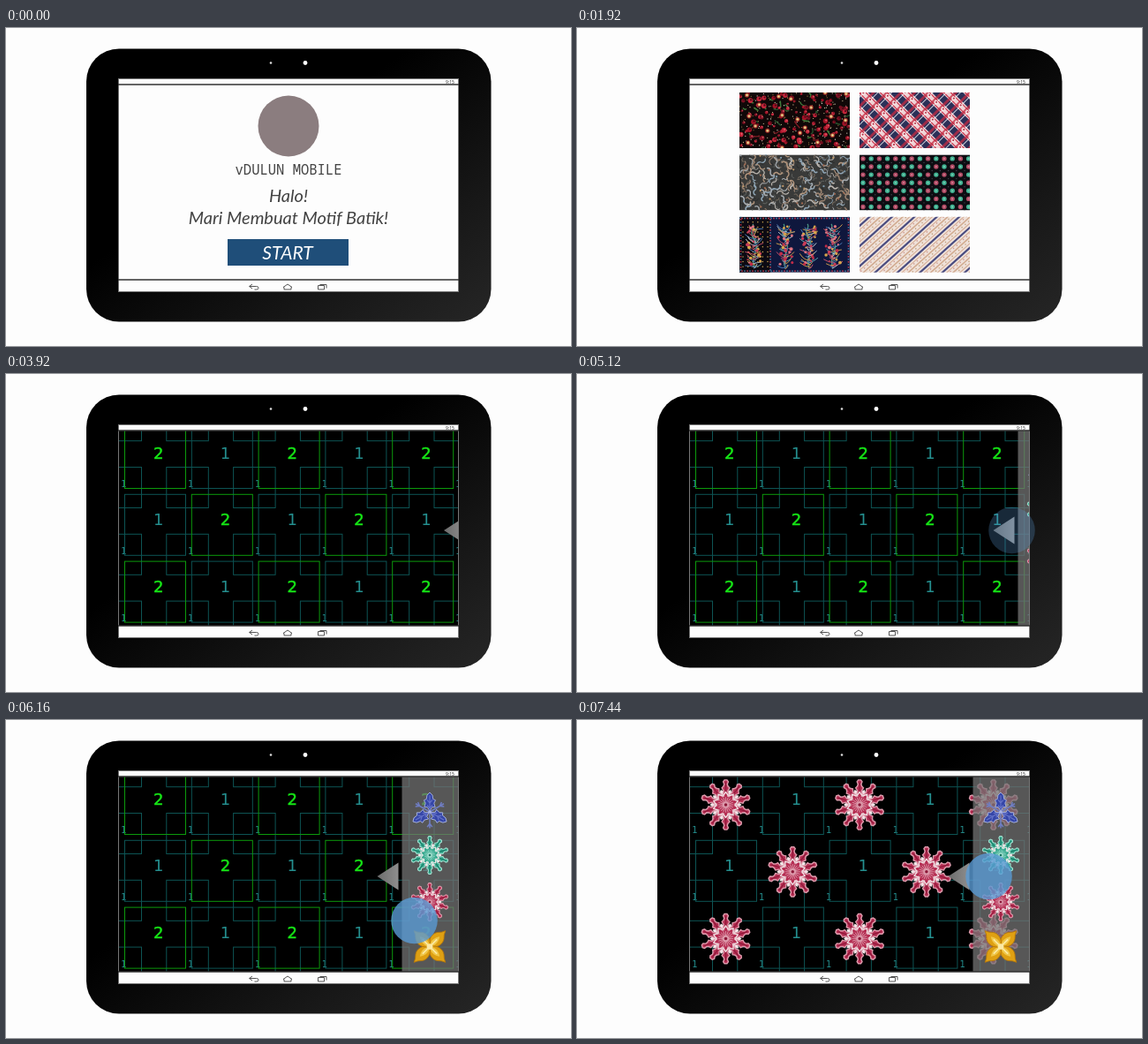
Animation, 640 px wide and 360 px high, one loop 8 s. Source, as an HTML page:

```html
<!DOCTYPE html>
<html lang="id">
<head>
<meta charset="utf-8">
<title>Motif Batik</title>
<style>
  html, body { margin: 0; width: 100%; height: 100%; overflow: hidden; background: #fdfdfd; }
  svg { display: block; width: 100vw; height: 100vh; }
  text { text-anchor: middle; }
  .lato { font: italic 400 20px Lato, sans-serif; fill: #424242; }
  .num { font: 18px "DejaVu Sans", sans-serif; }
</style>
</head>
<body>
<svg id="stage" viewBox="0 0 640 360"></svg>
<script>
const LOOP = 8000, STEP = 80;
const stage = document.getElementById('stage');

let seed = 7;
const rnd = (a = 1, b = 0) => {
  seed = (seed * 16807) % 2147483647;
  return b + (a - b) * seed / 2147483647;
};
const pick = list => list[Math.floor(rnd(list.length))];
const repeat = (n, fn) => Array.from({ length: n }, (_, i) => fn(i)).join('');
const rect = (x, y, w, h, attrs) => `<rect x="${x}" y="${y}" width="${w}" height="${h}" ${attrs}/>`;
const dot = (x, y, r, fill) => `<circle cx="${x}" cy="${y}" r="${r}" fill="${fill}"/>`;
const line = (d, stroke, w = 1) => `<path d="${d}" fill="none" stroke="${stroke}" stroke-width="${w}"/>`;
const group = (id, body, attrs = '') => `<g id="${id}" ${attrs}>${body}</g>`;
const spin = (n, body, from = 0) => repeat(n, i => `<g transform="rotate(${from + i * 360 / n})">${body}</g>`);

// Fabric tiles, each 125 x 63
const W = 125, H = 63;

// Evenly scattered spots: one jittered point per grid cell
const scatter = (cols, rows, draw) => repeat(cols * rows, i =>
  draw((i % cols + rnd()) * W / cols, (Math.floor(i / cols) + rnd()) * H / rows));

function floral() {
  return rect(0, 0, W, H, 'fill="#100808"') +
    scatter(22, 11, (x, y) => dot(x, y, .6, pick(['#d8c59a', '#e8e0d0', '#9c7a42']))) +
    scatter(9, 4, (x, y) =>
      line(`M${x} ${y}q${rnd(6, -6)} ${rnd(6, -6)} ${rnd(9, -9)} ${rnd(6, -6)}`, pick(['#3f7a3a', '#27502c', '#7a1a22']), 1.4)) +
    scatter(15, 7, (x, y) => {
      const r = rnd(2.9, 1.4);
      return dot(x, y, r, pick(['#a01226', '#7c1022', '#c2243a'])) + dot(x + .7, y - .7, r * .4, pick(['#d85a62', '#4a0a14']));
    }) +
    scatter(7, 3, (x, y) => dot(x, y, 2.7, '#8c1c25') + dot(x, y, 1.8, '#d3a25c') + dot(x, y, .8, '#f0dcb4'));
}

function plaid() {
  const bands = (step, w, color, shift = 0) =>
    repeat(24, i => rect(-100 + i * step + shift, -100, w, 220, `fill="${color}"`));
  return rect(0, 0, W, H, 'fill="#f0d3d6"') +
    '<g transform="translate(62 31)">' +
    `<g transform="rotate(-45)">${bands(17, 8, '#2b3058')}${bands(17, 1.2, '#c8344c', 9)}${bands(17, 1.2, '#c8344c', 14.5)}</g>` +
    `<g transform="rotate(45)" opacity=".75">${bands(11, 3, '#c22a42')}${bands(11, 1, '#fff', 4.5)}</g>` +
    `<g transform="rotate(-45)">${repeat(12, c => repeat(18, r => rect(-88.500 + c * 17, -98 + r * 11, 3, 5, 'fill="#f5e2e2"') +
      dot(-87 + c * 17, -95.5 + r * 11, 1, '#b02840')))}</g></g>`;
}

function curls() {
  return rect(0, 0, W, H, 'fill="#393a39"') +
    scatter(18, 9, (x, y) => `<g transform="rotate(${rnd(360)} ${x} ${y})">` +
      line(`M${x} ${y}q2 -3 5 0`, pick(['#5c5f5c', '#756a5e', '#2a2c2d']), 1) + '</g>') +
    scatter(16, 8, (x, y) => {
      const s = rnd(3.8, 1.6);
      return `<g transform="rotate(${rnd(360)} ${x} ${y})">` +
        line(`M${x} ${y}a${s} ${s} 0 0 1 ${s * 1.8} ${s * .4}a${s} ${s} 0 0 0 ${s * 1.7} ${s * .6}`,
          pick(['#a5abb0', '#8fa5b5', '#b3967e', '#9a8270', '#b9b4ae']), rnd(1.7, .8)) + '</g>';
    }) +
    scatter(9, 4, (x, y) => dot(x, y, 1.1, pick(['#a0674d', '#c19a6b', '#7f9aad'])));
}

function dots() {
  return rect(0, 0, W, H, 'fill="#0d0d12"') +
    repeat(7, r => repeat(14, c => {
      const x = 4 + c * 9.2, y = 4.5 + r * 9.1, teal = (r + c) % 2;
      return dot(x, y, 2.7, teal ? '#3fb090' : '#b04a64') + dot(x, y, .9, teal ? '#84d4bc' : '#d98a9c') +
        dot(x + 4.6, y + 4.5, .7, '#45424f');
    }));
}

function bouquet(x) {
  return `<g transform="translate(${x} 8)">` +
    line('M0 50C-6 36 8 30 0 18S2 5 -2 0', '#4f9c86', 1.2) +
    repeat(34, i => {
      const y = 2 + i * 1.35, dx = rnd(11, 2) * (i % 2 ? 1 : -1);
      return line(`M${-dx / 5} ${y + 4}Q${dx / 2} ${y + rnd(6, 1)} ${dx} ${y + rnd(3, -4)}`, pick(['#5f9fa8', '#c99a4a', '#4a76b0', '#b0bec8', '#c0506a']), 1);
    }) +
    repeat(26, i => dot(rnd(8, -8), 3 + i * 1.7, rnd(2, .9), pick(['#c83c58', '#dd7480', '#c02c48', '#d8a44c']))) + '</g>';
}

function panels() {
  const beads = (n, draw) => repeat(n, i => draw(i * 3, i % 2 ? '#c93f58' : '#4a7fa8'));
  return rect(0, 0, W, H, 'fill="#0f173d"') + rect(0, 0, 35, H, 'fill="#0c0a12"') +
    repeat(10, r => repeat(6, c => dot(4 + c * 5.6, 6 + r * 5.6, .75, '#c9a14d'))) +
    beads(42, (p, color) => dot(p, 1.7, .9, color) + dot(p, 61.3, .9, color)) +
    beads(21, (p, color) => dot(1.5, p, .9, color) + dot(35, p, .9, color) + dot(123.5, p, .9, color)) +
    [17, 52, 79, 106].map(bouquet).join('');
}

function stripes() {
  return rect(0, 0, W, H, 'fill="#efe2da"') +
    '<g transform="translate(62 31) rotate(48)">' +
    repeat(11, i => {
      const x = -92 + i * 17;
      return rect(x, -110, 2.2, 220, 'fill="#4a4c80"') + rect(x + 4, -110, 1, 220, 'fill="#d6ab92"') +
        rect(x + 8.5, -110, 1.6, 220, 'fill="#d2ab90"') + rect(x + 14, -110, 1, 220, 'fill="#d6ab92"') +
        repeat(40, k => dot(x + 6.3, -100 + k * 5, .8, '#cf9a94') + dot(x + 12, -98 + k * 5, .8, '#c4a584'));
    }) + '</g>';
}

const tiles = [floral, plaid, curls, dots, panels, stripes].map((draw, i) =>
  `<g transform="translate(${184 + i % 2 * 136} ${73 + Math.floor(i / 2) * 70.4})" clip-path="url(#tileClip)">${draw()}</g>`).join('');

// Motifs, drawn at unit radius
function snowflake(color, dark, pale) {
  const arm = 'M-.05 -.2L-.1 -.42L-.08 -.54L-.15 -.66L-.09 -.72L-.06 -.8L-.1 -.9L-.05 -.97H.05L.1 -.9L.06 -.8L.09 -.72L.15 -.66L.08 -.54L.1 -.42L.05 -.2Z';
  return spin(10, '<path d="M0 0L-.09 -.52L0 -.62L.09 -.52Z" fill="#f3e6e8"/>', 18) +
    spin(10, `<path d="${arm}" fill="${color}" stroke="${pale}" stroke-width=".05"/>` + line('M0 -.5V-.88', dark, .04)) +
    spin(10, line('M-.1 -.36L0 -.5L.1 -.36', '#f3e6e8', .045)) +
    dot(0, 0, .33, color) + spin(20, line('M0 .12V.3', pale, .03)) + dot(0, 0, .13, pale) + dot(0, 0, .06, dark);
}

function trident() {
  const leaf = 'M0 -.05L-.13 -.25L-.28 -.24L-.22 -.45L-.3 -.6L-.17 -.66L-.14 -.86L0 -1L.14 -.86L.17 -.66L.3 -.6L.22 -.45L.28 -.24L.13 -.25Z';
  return spin(3, `<path d="${leaf}" fill="#3546a8" stroke="#a9b4e0" stroke-width=".04"/>` +
      line('M0 -.1V-.85M-.14 -.35L0 -.2L.14 -.35M-.14 -.62L0 -.46L.14 -.62', '#6674c8', .05)) +
    spin(3, line('M0 0V.84M-.13 .78L0 .6L.13 .78', '#6f7dc2', .07)) + dot(0, 0, .08, '#aab4e8');
}

function blossom() {
  const petal = 'M0 0C-.36 -.2 -.42 -.62 -.24 -.84Q-.08 -.98 0 -1.2Q.08 -.98 .24 -.84C.42 -.62 .36 -.2 0 0Z';
  return spin(4, `<path d="${petal}" fill="#dfa012" stroke="#b87808" stroke-width=".04"/>` +
    '<path d="M0 0C-.2 -.25 -.18 -.5 0 -.75C.18 -.5 .2 -.25 0 0Z" fill="#f0c648"/>' +
    line('M0 0V-.55', '#fbe9a4', .08), 45) + dot(0, 0, .16, '#fbe9a4');
}

const place = (id, x, y, r) => `<use href="#${id}" transform="translate(${x} ${y}) scale(${r})"/>`;

// Numbered repeat grid: large cells with a small slot across every cell corner
const PITCH = 75.8, TEAL = '#0d5454';
const grid = (cols, fromRow) => {
  const list = [];
  for (let row = fromRow; row < 3; row++)
    for (let col = 0; col < cols; col++)
      list.push({ x: 134.500 + col * PITCH, y: 60.500 + row * PITCH, main: (row + col) % 2 === 0 });
  return list;
};
const cells = grid(5, 0), corners = grid(6, -1);
const mains = cells.filter(c => c.main);
const label = (c, n, fill, attrs = '') => `<text class="num" x="${c.x + 38.2}" y="${c.y + 35}" fill="${fill}" ${attrs}>${n}</text>`;
const box = (c, stroke) => rect(c.x, c.y, 69, 69, `fill="none" stroke="${stroke}"`);

const base =
  corners.map(c => rect(c.x - 28.5, c.y + 45, 47.500, 46, `fill="none" stroke="${TEAL}"`) +
    `<text x="${c.x - 1}" y="${c.y + 67.5}" font-size="10" font-family="DejaVu Sans, sans-serif" fill="#248f8f">1</text>`).join('') +
  cells.filter(c => !c.main).map(c => box(c, TEAL) + label(c, 1, '#248f8f')).join('');

const drawer = rect(524, 64, 140, 221, 'fill="#757575" opacity=".75"') +
  '<path d="M496 177L520 161.500V192.500Z" fill="url(#tip)"/>' +
  place('blue', 555.5, 104, 22) + place('green', 555.5, 153, 22) +
  place('red', 555.5, 206, 22) + place('gold', 555.5, 256.500, 21);

stage.innerHTML = `
  <defs>
    <linearGradient id="body" x1="0" y1="0" x2="1" y2="1">
      <stop offset=".4" stop-color="#000"/><stop offset=".75" stop-color="#171717"/><stop offset="1" stop-color="#262626"/>
    </linearGradient>
    <linearGradient id="tip"><stop stop-color="#6c6c6c"/><stop offset="1" stop-color="#8e8e8e"/></linearGradient>
    <clipPath id="tileClip">${rect(0, 0, W, H, '')}</clipPath>
    <clipPath id="viewClip">${rect(128, 64, 384, 221, '')}</clipPath>
    ${group('red', snowflake('#b52d52', '#8c1838', '#dc9aab'))}
    ${group('green', snowflake('#2fa58a', '#177560', '#a4dfd0'))}
    ${group('blue', trident())}
    ${group('gold', blossom())}
  </defs>` +
  rect(0, 0, 640, 360, 'fill="#fdfdfd"') +
  rect(91, 23.5, 458.5, 309, 'rx="37" fill="url(#body)"') +
  dot(300, 39.5, 1.3, '#ddd') + dot(339, 39.5, 2.4, '#fff') +
  rect(127.5, 57.5, 385, 241, 'fill="#fdfdfd" stroke="#777"') +
  group('welcome',
    dot(320, 111, 34.5, '#8b7d7f') +
    '<text x="320" y="166" font-family="Noto Sans Mono, monospace" font-size="15.5" font-weight="300" fill="#444">vDULUN MOBILE</text>' +
    '<text class="lato" x="320" y="197">Halo!</text>' +
    '<text class="lato" x="320" y="222">Mari Membuat Motif Batik!</text>' +
    rect(251, 239, 137, 30, 'id="button" fill="#1f4e79"') +
    '<text class="lato" x="319" y="261.500" style="fill:#fff;font-size:21px">START</text>') +
  group('choices', tiles) +
  group('editor',
    rect(127, 64, 386, 221, 'fill="#000"') + base +
    group('slots', mains.map(c => box(c, '#0c9a0c') + label(c, 2, '#16e616', 'stroke="#16e616" stroke-width=".5"')).join('')) +
    group('filled', mains.map(c => place('red', c.x + 34, c.y + 35.500, 29)).join('')) +
    group('drawer', drawer), 'clip-path="url(#viewClip)"') +
  line('M127 64H513M127 285H513', '#333', 1.3) +
  '<text x="503" y="62.500" font-family="Noto Sans, sans-serif" font-size="5" fill="#333">9:15</text>' +
  line('M279 290l-3.500 2.500l3.500 2.500M276 292.500h7.500q2.500 0 2.500 1.800t-2.500 1.800h-2', '#555') +
  line('M314 293.500l5-3.500l5 3.500h-1v2.500h-8v-2.500z', '#555') +
  line('M353.500 291.500h7v4.500h-7zM355.500 290.500h7.500v4', '#555') +
  group('dragged', '<use href="#red" transform="scale(22)"/>') +
  group('touch', dot(0, 0, 26.3, '#5b9bd5'));

const el = id => document.getElementById(id);
const clamp = v => Math.max(0, Math.min(1, v));
const ease = v => { const p = clamp(v); return p * p * (3 - 2 * p); };
const show = (id, on) => el(id).setAttribute('display', on ? 'inline' : 'none');
const move = (id, x, y) => el(id).setAttribute('transform', `translate(${x} ${y})`);

function touchState(t, drag) {
  if (t >= 7440) return [466.5, 177, 1];
  if (t >= 7360) return [0, 0, 0];
  if (t >= 5760) return [462.5 - 236 * drag, 227 - 34 * drag, clamp((t - 5680) / 480)];
  const fade = t < 4880 ? (t - 3920) / 400 : 1 - (t - 4800) / 480;
  return [492.5, 177, clamp(fade)];
}

function render(now) {
  const t = Math.floor(now % LOOP / STEP) * STEP;
  const drag = ease((t - 6420) / 860);
  const done = t >= 7360;
  show('welcome', t < 1920);
  show('choices', t >= 1920 && t < 3920);
  show('editor', t >= 3920);
  show('slots', !done);
  show('filled', done);
  show('dragged', t >= 6480 && !done);
  el('button').setAttribute('fill', t === 1120 ? '#2e6ca4' : '#1f4e79');
  move('drawer', -75.5 * ease((t - 4800) / 840), 0);
  move('dragged', 480 - 236 * drag, 206 - 34 * drag);
  const [x, y, alpha] = touchState(t, drag);
  move('touch', x, y);
  el('touch').setAttribute('opacity', alpha * .8);
}

const start = performance.now();
function tick() {
  render(performance.now() - start);
  requestAnimationFrame(tick);
}
tick();
</script>
</body>
</html>
```
